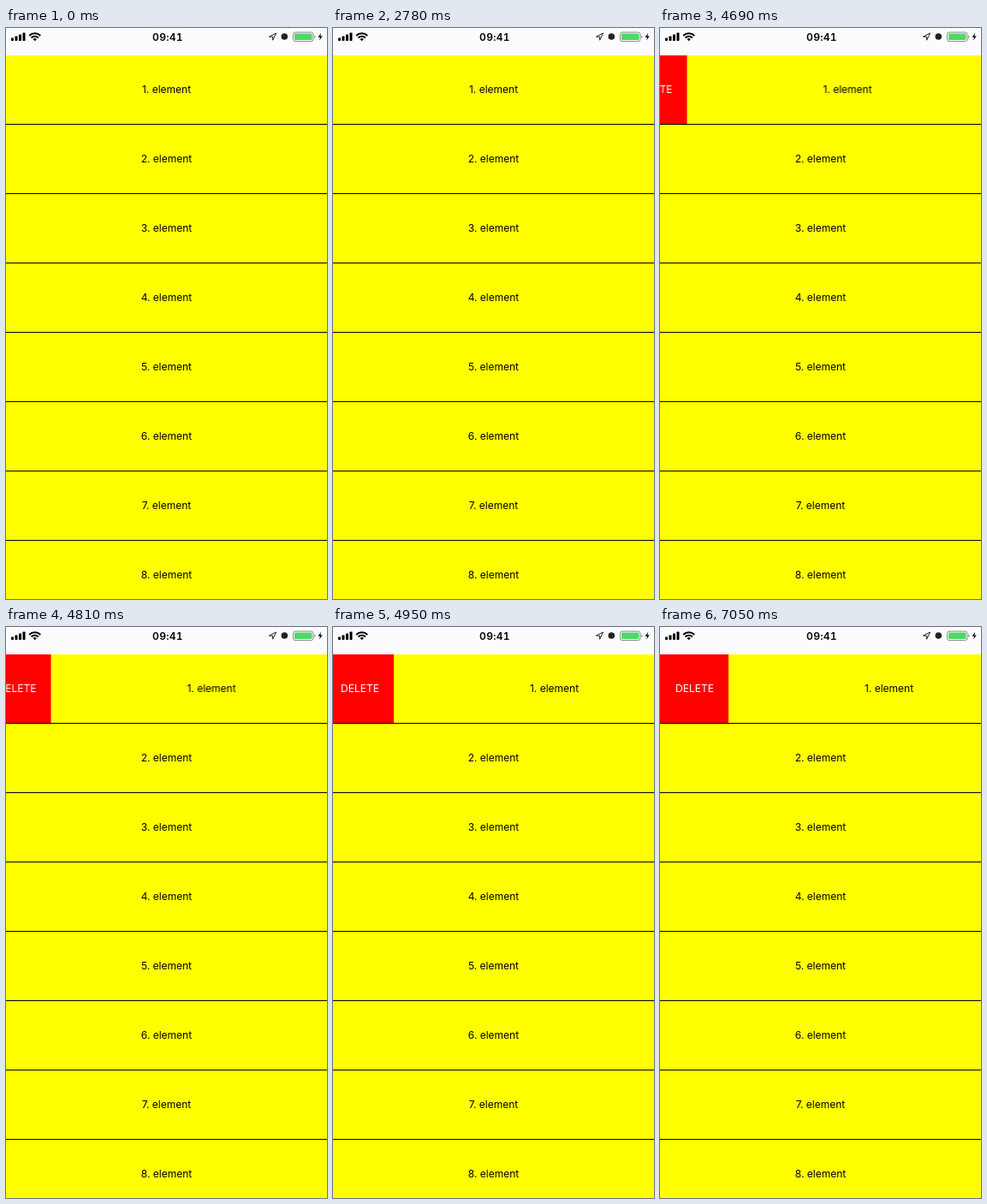
These frames come from a looping animation (375x667 px, 8000 ms). An HTML page:

```html
<!DOCTYPE html>
<html lang="en">
<head>
<meta charset="utf-8">
<title>Swipe to delete</title>
<style>
  html, body { margin: 0; width: 100%; height: 100%; overflow: hidden; }
  body { position: relative; background: #fcfcfe; color: #000; font: 12px Inter, Roboto, sans-serif; }
  .status { position: absolute; left: 0; top: 0; width: 375px; height: 32px; }
  .clock {
    position: absolute; left: 0; top: 0; width: 378px; line-height: 21px;
    text-align: center; font-weight: 600; letter-spacing: .3px;
    font-variant-numeric: tabular-nums;
  }
  .list { position: absolute; left: 0; top: 32px; width: 375px; height: 635px; overflow: hidden; }
  .row {
    position: relative; height: 80px; overflow: hidden;
    background: #ff0; border-bottom: 1px solid #000;
    line-height: 80px; text-align: center;
  }
  .slider { position: relative; height: 80px; }
  .delete {
    position: absolute; left: -80px; top: 0; width: 80px; height: 80px;
    box-sizing: border-box; padding-left: 1px;
    background: #f00; color: #fff;
  }
</style>
</head>
<body>
<svg class="status" viewBox="0 0 375 32">
  <g id="signal"></g>
  <g fill="none" stroke="#000" stroke-width="2.1">
    <path d="M27.2 9A9.2 9.2 0 0 1 40.2 9"/>
    <path d="M29.6 11.5A5.8 5.8 0 0 1 37.8 11.5"/>
  </g>
  <path d="M33.7 15.2L31.5 13A3.1 3.1 0 0 1 35.9 13Z"/>
  <path d="M307.4 10.2L315.6 6L311.6 14.2V10.2Z" fill="none" stroke="#222" stroke-width="1" stroke-linejoin="round"/>
  <circle cx="325.3" cy="10" r="3.8" fill="#222"/>
  <rect x="335.5" y="5" width="23.5" height="10.6" rx="2.5" fill="none" stroke="#888"/>
  <rect x="337" y="6.5" width="20.5" height="7.6" rx="1.2" fill="#4cd964"/>
  <path d="M360.2 8.5a2 2 0 0 1 0 3.6Z" fill="#888"/>
  <path d="M368.2 5.8L364.6 10.7H367L366 14.6L369.8 9.5H367.3Z"/>
</svg>
<div class="clock">09:41</div>
<div class="list"></div>
<script>
  const LOOP = 8000;
  // [time in ms, how far the first row is pulled to the right]
  const PULL = [
    [0, 0], [4670, 17], [4690, 31.5], [4790, 43], [4810, 52.5], [4830, 60],
    [4930, 66], [4950, 71], [4970, 75], [5070, 77.5], [5090, 79], [5110, 80], [LOOP, 80]
  ];

  function add(parent, className, text = '') {
    const el = document.createElement('div');
    el.className = className;
    el.textContent = text;
    parent.append(el);
    return el;
  }

  const bars = [3.5, 5.5, 7.5, 9.5].map((h, i) =>
    `<rect x="${6 + i * 4.5}" y="${15 - h}" width="3" height="${h}" rx=".7"/>`);
  document.getElementById('signal').innerHTML = bars.join('');

  const list = document.querySelector('.list');
  const sliders = Array.from({ length: 8 }, (_, i) =>
    add(add(list, 'row'), 'slider', `${i + 1}. element`));
  add(sliders[0], 'delete', 'DELETE');

  sliders[0].animate(
    PULL.map(([time, x]) => ({
      offset: time / LOOP, transform: `translateX(${x}px)`, easing: 'step-end'
    })),
    { duration: LOOP, iterations: Infinity }
  );
</script>
</body>
</html>
```
